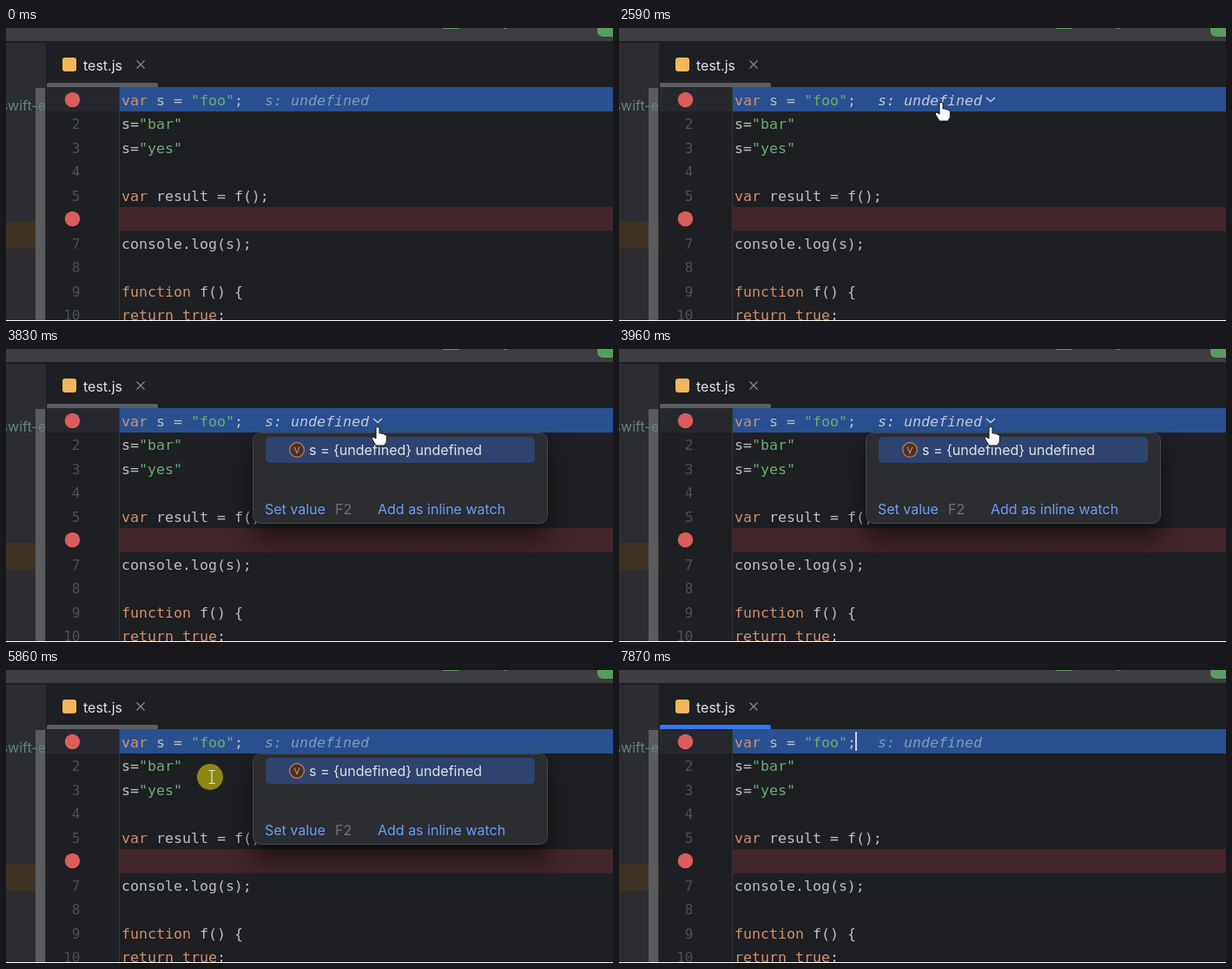
Recreate the animation shown at these times as an HTML page. Size 699 px wide and 337 px high, loop 8 s.

```html
<!DOCTYPE html>
<html lang="en">
<head>
<meta charset="utf-8">
<title>Inline debugging</title>
<style>
  html, body { margin: 0; width: 100%; height: 100%; overflow: hidden; background: #1e1f22; }
  svg { display: block; }
  text { white-space: pre; font: 16px Inter, sans-serif; fill: #dfe1e5; }
  .code text { font: 16.6px "DejaVu Sans Mono", monospace; fill: #bcbec4; }
  .code .number { font-size: 16px; fill: #4b5059; text-anchor: end; }
  .code #hint { font-style: italic; }
  .keyword { fill: #cf8e6d; }
  .string { fill: #6aab73; }
  .link { fill: #6b9bfa; }
  .breakpoint { fill: #db5c5c; }
  #popup .panel { filter: drop-shadow(0 18px 14px #0008); }
</style>
</head>
<body>
<svg width="699" height="337">
  <!-- toolbar and project panel -->
  <rect width="699" height="15" fill="#3c3e41"/>
  <rect x="503" width="19" height="1" fill="#57965c"/>
  <path d="M573 0h4" stroke="#9a9da3"/>
  <path d="M681 0V3Q681 10 688 10H699V0Z" fill="#5a9b60"/>
  <rect y="17" width="46" height="319" fill="#2b2d30"/>
  <rect y="223" width="46" height="31" fill="#3d3223"/>
  <rect x="34" y="69" width="11" height="267" fill="#595b5d"/>
  <text x="46" y="95" text-anchor="end" style="fill:#66827a">swift-e</text>

  <!-- tab -->
  <rect x="65" y="34" width="16" height="16" rx="3" fill="#f2b75c"/>
  <text x="89" y="49">test.js</text>
  <path d="M150.500 37.500l9 9m0-9l-9 9" stroke="#868a91" stroke-width="1.200"/>
  <rect id="underline" x="47" y="63" width="128" height="6" rx="2"/>

  <!-- editor -->
  <rect x="47" y="68" width="83" height="28" fill="#26282e"/>
  <path d="M130.500 68V336" stroke="#313438"/>
  <rect x="131" y="68" width="568" height="28" fill="#2a5091"/>
  <rect x="131" y="206" width="568" height="27.500" fill="#43262b"/>
  <circle class="breakpoint" cx="76.500" cy="82.500" r="8.700"/>
  <circle class="breakpoint" cx="76.500" cy="219.500" r="8.700"/>
  <g class="code">
    <g id="lines"></g>
    <text id="hint" x="298" y="89">s: undefined</text>
  </g>
  <path id="chevron" d="M423 80l5 4.500 5-4.500" fill="none" stroke="#c3cbda" stroke-width="1.400"/>
  <rect id="caret" x="272" y="71" width="2" height="22" fill="#ced0d6"/>

  <g id="popup">
    <rect class="panel" x="284.500" y="96.500" width="339" height="104" rx="9" fill="#2b2d30" stroke="#43454a"/>
    <rect x="299" y="101" width="310" height="30" rx="5" fill="#2e436e"/>
    <circle cx="335" cy="116" r="8.300" fill="#45322b" stroke="#c77d55" stroke-width="1.300"/>
    <path d="M332 112.500l3 7 3-7" fill="none" stroke="#c77d55" stroke-width="1.300"/>
    <text x="349" y="122">s = {undefined} undefined</text>
    <text class="link" x="298" y="190">Set value</text>
    <text x="379" y="190" style="fill:#6f737a">F2</text>
    <text class="link" x="428" y="190">Add as inline watch</text>
  </g>

  <rect y="336" width="699" height="1" fill="#fff"/>

  <g id="pointer">
    <circle id="click" cx="-2" cy="0" r="15" fill="#a09a10" fill-opacity=".86"/>
    <path id="beam" d="M-3.500-7.500h2.500l1 1 1-1h2.500M0-6.500v13M-3.500 7.500h2.500l1-1 1 1h2.500" fill="none" stroke="#e4e4e4" stroke-width="1.200"/>
    <path id="hand" d="M-2 1.500Q0-1 2 1.500V8q2-1 3 .6 2-.8 3 .9 2.400-.4 2.400 2V16q0 3-2 4.500V22H-2L-6.500 14.500q-1-3 1.500-2.500l3 2Z" fill="#fff" stroke="#111"/>
    <path id="arrow" d="M0 0V16l4-3.500 2.500 6 2.500-1-2.500-6H12Z" fill="#fff" stroke="#111"/>
  </g>
</svg>
<script>
const LOOP = 8000;
const get = id => document.getElementById(id);
const show = (id, visible) => get(id).style.display = visible ? "" : "none";
const during = (t, ...spans) => spans.some(([from, to]) => t >= from && t < to);

const source = [
  'var s = "foo";', 's="bar"', 's="yes"', '', 'var result = f();',
  '', 'console.log(s);', '', 'function f() {', 'return true;'
];
const highlight = line => line
  .replace(/"\w+"|\b(var|function|return|true)\b/g, word =>
    `<tspan class=${word[0] === '"' ? "string" : "keyword"}>${word}</tspan>`);

get("lines").innerHTML = source.map((line, i) => {
  const y = 88.5 + i * 27.5;
  const number = i === 0 || i === 5 ? "" : `<text class="number" x="85.5" y="${y}">${i + 1}</text>`;
  return `${number}<text x="133" y="${y}">${highlight(line)}</text>`;
}).join("");

// Each move runs in discrete steps: first step, last step, step count, destination.
const entry = [520, 288];
const moves = [
  [550, 1020, 8, 433, 153],
  [1420, 1840, 7, 367, 98],
  [1910, 2120, 4, 358, 82],
  [2590, 2590, 1, 371, 85],
  [2660, 3140, 7, 428, 89],
  [5020, 5590, 9, 237, 123],
  [6410, 6610, 4, 207, 326]
];

function pointerAt(t) {
  let [x, y] = entry;
  for (const [start, end, steps, toX, toY] of moves) {
    if (t < start) break;
    const interval = (end - start) / (steps - 1) || 1;
    const done = Math.min(steps, Math.floor((t - start) / interval + 1e-6) + 1) / steps;
    x += (toX - x) * done;
    y += (toY - y) * done;
  }
  return [x, y];
}

function draw(t) {
  const [x, y] = pointerAt(t);
  const popup = during(t, [3760, 5930]);
  const focused = during(t, [3560, 3760], [5930, LOOP]);
  const onHint = y < 97 && x > 298 && x < 437;
  const onPopup = popup && y >= 97 && x > 284;

  show("pointer", during(t, [550, 6940]));
  get("pointer").setAttribute("transform", `translate(${x} ${y})`);
  show("hand", onHint);
  show("arrow", onPopup);
  show("beam", !onHint && !onPopup);
  show("click", during(t, [3560, 3830], [5860, 6130]));

  show("popup", popup);
  show("chevron", onHint);
  show("caret", during(t, [3560, 3760], [5930, 6410], [6870, 7410], [7870, LOOP]));
  get("hint").style.fill = onHint ? "#c0c8d8" : "#7d9bbd";
  get("underline").style.fill = focused ? "#3574f0" : "#5b5d60";
}

const begin = performance.now();
function frame() {
  draw((performance.now() - begin) % LOOP);
  requestAnimationFrame(frame);
}
frame();
</script>
</body>
</html>
```
